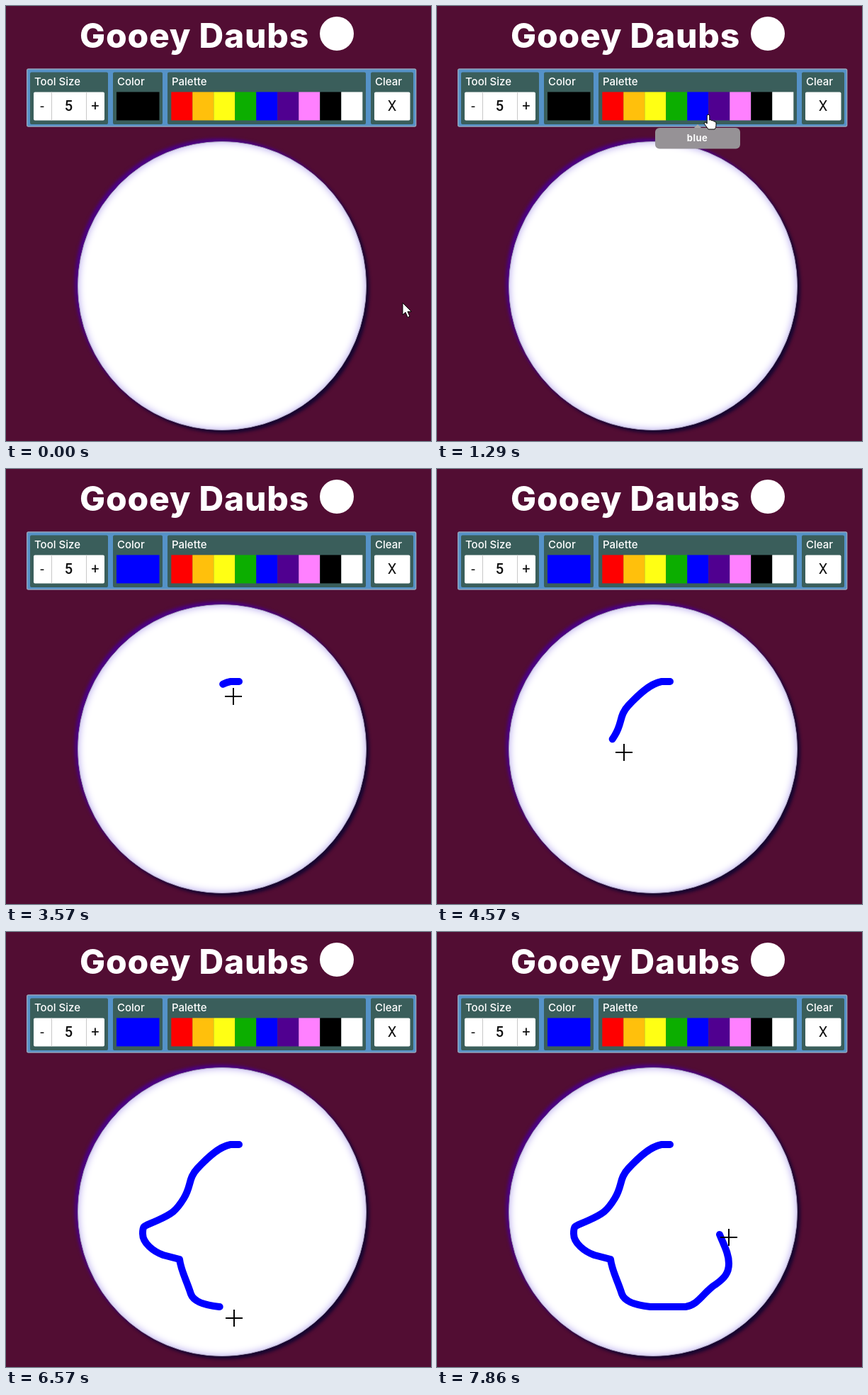
An HTML page that plays this animation: 600x614 px, repeating every 8000 ms.

```html
<!DOCTYPE html>
<html lang="en">
<head>
<meta charset="utf-8">
<title>Gooey Daubs</title>
<style>
  html, body { margin: 0; width: 100%; height: 100%; overflow: hidden; background: #520d33; }
  svg, .dish { position: absolute; left: 0; top: 0; }
  .dish {
    left: 100.5px; top: 190.5px; width: 408px; height: 408px; box-sizing: border-box;
    border-radius: 50%; border: 1.5px solid #aaa4c0; background: #fff;
    box-shadow: inset 0 0 11px #b4a6ee, -4px -4px 4px #4b0082, 4px 4px 4px #170530;
  }
  .title { font: 800 48px Inter, sans-serif; letter-spacing: .8px; }
  .label { font: 500 15px Inter, sans-serif; }
  .key { font: 20px Roboto, sans-serif; text-anchor: middle; fill: #111; }
  .tip { font: 700 13px Inter, sans-serif; letter-spacing: .5px; text-anchor: middle; }
</style>
</head>
<body>
<div class="dish"></div>
<svg width="600" height="614" viewBox="0 0 600 614" fill="#fff">
  <text class="title" x="104" y="58.5">Gooey Daubs</text>
  <circle cx="467" cy="39" r="24"/>
  <rect x="29.7" y="89" width="549" height="81" rx="2" fill="#5592c8" stroke="#94a4ba" stroke-width="1.4"/>
  <g id="panels"></g>
  <g id="swatches"></g>
  <rect x="39" y="121.4" width="100" height="40" rx="2"/>
  <path d="M64.5 121.4v40M113.5 121.4v40" stroke="#c8c8c8"/>
  <text class="key" x="51" y="147.5">-</text>
  <text class="key" x="88.5" y="147.5" font-weight="500" style="font-weight:500">5</text>
  <text class="key" x="126" y="147">+</text>
  <rect id="color" x="156" y="121.4" width="60.5" height="40"/>
  <rect x="520" y="121.4" width="50.5" height="40" rx="2"/>
  <text class="key" x="545" y="147.5">X</text>

  <g id="tip">
    <path d="M363 172l5-5 5 5z" fill="#a8a8a8"/>
    <rect x="308" y="172" width="120" height="29.5" rx="6" fill="#969296"/>
    <text class="tip" x="367.5" y="191">blue</text>
  </g>

  <path id="ink" fill="none" stroke="#00f" stroke-width="10" stroke-linecap="round" stroke-linejoin="round"
    d="M329 300H317C300 303 283 320 270 334S262 358 251 376 234 398 214 407 193 413 193 426 208 451 222 456L245 462
       C247 478 255 492 261 511C265 522 282 527 301 529H351C370 526 376 508 394 497C405 489 412 482 412 468S405 442 399 427"/>

  <path id="arrow" d="M0 0V17L4 13.3 7 20.5 10 19.2 7 12.3H12.3Z" stroke="#000"/>
  <path id="hand" d="M-1.8 12V1Q-1.8-.8 0-.8T1.8 1V7Q4 5.8 5 8 7 6.8 8 9 10.5 8 11 11V15Q11 17.5 9 20H0L-5.5 12.5Q-6.5 10-4 10Z" stroke="#000"/>
  <path id="cross" d="M-12 0H12M0-12V12" stroke="#000" stroke-width="2"/>
</svg>
<script>
const $ = id => document.getElementById(id);

$('panels').innerHTML = [['Tool Size', 34, 110], ['Color', 151, 70], ['Palette', 228, 280], ['Clear', 515, 60]]
  .map(([name, x, w]) => `<rect x="${x}" y="93.5" width="${w}" height="73.5" rx="2" fill="#3a5e5b"/>
    <text class="label" x="${x + 6}" y="112.3">${name}</text>`).join('');

$('swatches').innerHTML = ['#f00', '#ffc00c', '#ffff14', '#0cae00', '#00f', '#500090', '#ff80ff', '#000', '#fff']
  .map((c, i) => `<rect x="${233.3 + i * 30}" y="121.4" width="30" height="40" fill="${c}"/>`).join('');

// [ms, x, y] before the drawing starts
const pointer = [
  [140, 560, 419], [570, 455, 25], [710, 440, 47], [860, 440, 47],
  [1290, 383, 154], [2000, 374, 148], [2290, 339, 280], [3390, 345, 317]
];
// [ms, share of the line drawn, crosshair's offset from its end]
const pen = [[3390, 0, 16, 17], [3570, .042, 15, 17], [5430, .382, 17.5, 19.5], [6570, .664, 21, 16], [7860, 1, 13, 4]];

function at(keys, t) {
  const i = keys.findIndex(k => k[0] > t);
  if (i <= 0) return keys.at(i).slice(1);
  const a = keys[i - 1], b = keys[i], p = (t - a[0]) / (b[0] - a[0]);
  return a.slice(1).map((v, j) => v + (b[j + 1] - v) * p);
}

const ink = $('ink'), total = ink.getTotalLength();
const show = (id, on) => $(id).setAttribute('visibility', on ? 'visible' : 'hidden');

function draw(now) {
  // The screen updates seven times a second
  const t = Math.floor((now % 8000 + 5) * 7 / 1000) / 7 * 1000 + 4;
  const drawing = t >= 3390;
  let [x, y] = at(pointer, t);
  if (drawing) {
    const [share, dx, dy] = at(pen, t);
    const end = ink.getPointAtLength(share * total);
    [x, y] = [end.x + dx, end.y + dy];
    ink.setAttribute('stroke-dasharray', `${share * total} 9999`);
  }

  const kind = t < 1100 ? 'arrow' : t < 2100 ? 'hand' : 'cross';
  for (const id of ['arrow', 'hand', 'cross']) show(id, id === kind);
  $(kind).setAttribute('transform', `translate(${Math.round(x)} ${Math.round(y)})`);

  show('ink', drawing);
  show('tip', t > 1200 && t < 2100);
  $('color').setAttribute('fill', t < 1800 ? '#000' : '#00f');
}

const start = performance.now();
function loop() {
  draw(performance.now() - start);
  requestAnimationFrame(loop);
}
loop();
</script>
</body>
</html>
```
